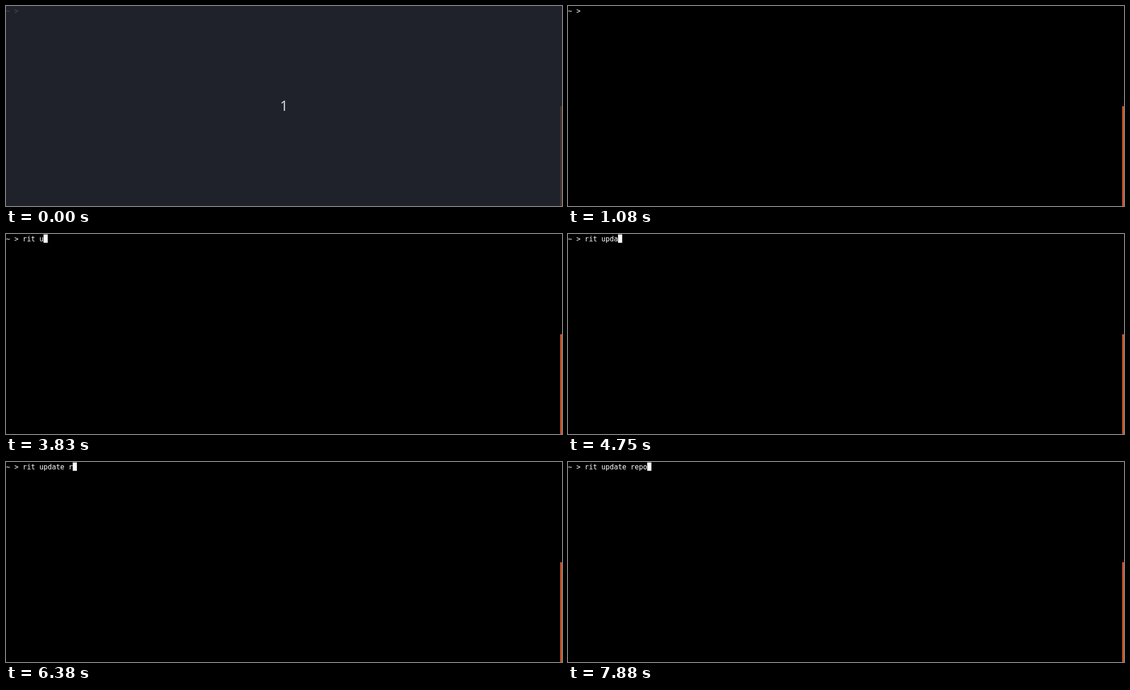
An HTML page with a canvas for the animation above (8000 ms loop, 1200 by 433 pixels).

```html
<!DOCTYPE html>
<html lang="en">
<head>
<meta charset="utf-8">
<title>Terminal</title>
<style>
  html, body { margin: 0; width: 100%; height: 100%; overflow: hidden; background: #000; }
  canvas { display: block; }
</style>
</head>
<body>
<canvas id="stage" width="1200" height="433"></canvas>
<script>
const ctx = document.getElementById('stage').getContext('2d', { alpha: false });
const W = 1200, H = 433, LOOP = 8000;
const CELL = 9, BASELINE = 16;
const PROMPT = '~ > ';
const COMMAND = 'rit update repo';

// When each character of the command is typed, in ms
const keyTimes = [2630, 2830, 3080, 3460, 3830, 4080, 4290, 4750,
                  5290, 5380, 5460, 6380, 6920, 7670, 7880];
// Spans in which the cursor is hidden
const hidden = [[0, 460], [1080, 1670], [2250, 2580], [6000, 6330], [7500, 7590]];
const COUNTDOWN_END = 40;

function drawText(text, color) {
  ctx.font = '15px "DejaVu Sans Mono", monospace';
  ctx.textAlign = 'left';
  ctx.textBaseline = 'alphabetic';
  ctx.fillStyle = color;
  [...text].forEach((ch, i) => ctx.fillText(ch, i * CELL, BASELINE));
}

function drawEdge(color) {
  ctx.fillStyle = color;
  ctx.fillRect(1196, 217, 4, H - 217);
}

function fillStage(color) {
  ctx.fillStyle = color;
  ctx.fillRect(0, 0, W, H);
}

function drawCountdown() {
  fillStage('#1f222a');
  drawText(PROMPT, '#4b4e55');
  drawEdge('#46342f');
  ctx.font = '30px "Noto Sans", "Open Sans", sans-serif';
  ctx.textAlign = 'center';
  ctx.fillStyle = '#d3d4d6';
  ctx.fillText('1', 600, 227);
}

function drawTerminal(t) {
  const typed = keyTimes.filter(k => k <= t).length;
  const line = PROMPT + COMMAND.slice(0, typed);
  fillStage('#000');
  drawText(line, '#fff');
  if (!hidden.some(([from, to]) => t >= from && t < to)) {
    ctx.fillStyle = '#fff';
    ctx.fillRect(line.length * CELL, 1, CELL, 18);
  }
  drawEdge('#c6562b');
}

function render(t) {
  if (t < COUNTDOWN_END) drawCountdown();
  else drawTerminal(t);
}

const start = performance.now();
function tick() {
  render((performance.now() - start) % LOOP);
  requestAnimationFrame(tick);
}
render(0);
requestAnimationFrame(tick);
</script>
</body>
</html>
```
